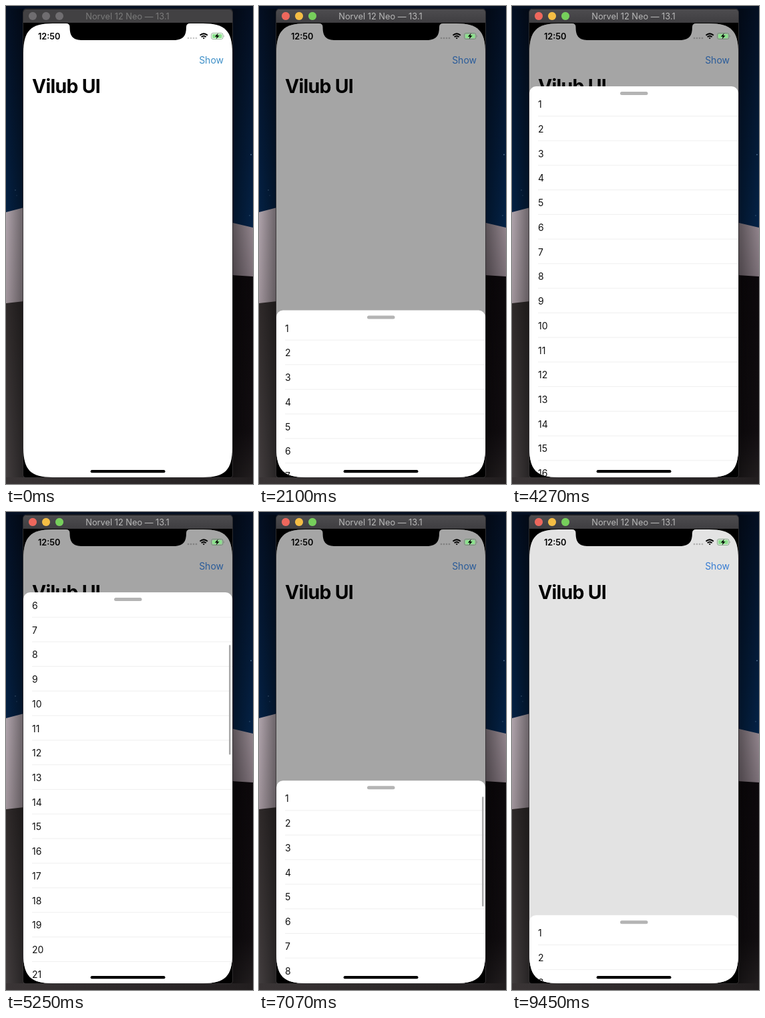
An HTML page for the animation above (9520 ms loop, 370 by 714 pixels).

```html
<!DOCTYPE html>
<html lang="en">
<head>
<meta charset="utf-8">
<title>Bottom sheet</title>
<style>
  html, body { margin: 0; width: 100%; height: 100%; overflow: hidden; background: #050f20; }
  svg { display: block; width: 370px; height: 714px; font-family: Inter, Roboto, sans-serif; }
</style>
</head>
<body>
<svg viewBox="0 0 370 714" xmlns="http://www.w3.org/2000/svg">
  <defs>
    <linearGradient id="sky" x2="0" y2="1"><stop stop-color="#040f22"/><stop offset="1" stop-color="#042348"/></linearGradient>
    <linearGradient id="duneL" x2="0" y2="1"><stop stop-color="#b0a4ac"/><stop offset="1" stop-color="#a0949b"/></linearGradient>
    <linearGradient id="duneR" x2="0" y2="1"><stop stop-color="#93868e"/><stop offset="1" stop-color="#7c7078"/></linearGradient>
    <linearGradient id="darkL" x2="0" y2="1"><stop stop-color="#2f2a2a"/><stop offset="1" stop-color="#433e3f"/></linearGradient>
    <linearGradient id="darkR" x2="0" y2="1"><stop stop-color="#0c080b"/><stop offset=".75" stop-color="#110d10"/><stop offset="1" stop-color="#242021"/></linearGradient>
    <linearGradient id="floor"><stop stop-color="#3a3536"/><stop offset="1" stop-color="#221e1f"/></linearGradient>
    <linearGradient id="shadeL"><stop stop-opacity="0"/><stop offset="1" stop-opacity=".4"/></linearGradient>
    <linearGradient id="shadeR"><stop stop-opacity=".4"/><stop offset="1" stop-opacity="0"/></linearGradient>
    <linearGradient id="bar" x2="0" y2="1"><stop stop-color="#4d4c4f"/><stop offset="1" stop-color="#3f3e41"/></linearGradient>
    <clipPath id="screen">
      <path d="M26 70C26 37 37 26 70 26H295C328 26 339 37 339 70V660C339 693 328 704 295 704H70C37 704 26 693 26 660Z"/>
    </clipPath>
    <clipPath id="list"><rect x="26" y="8" width="314" height="700"/></clipPath>
  </defs>

  <rect width="370" height="340" fill="url(#sky)"/>
  <g fill="#4a6a8c">
    <circle cx="14" cy="275" r=".8"/><circle cx="16" cy="283" r=".6"/>
    <circle cx="367" cy="222" r="1"/><circle cx="365" cy="313" r=".7"/>
  </g>
  <path d="M0 308L27 301V446H0Z" fill="url(#duneL)"/>
  <path d="M338 323.500L370 331V406H338Z" fill="url(#duneR)"/>
  <path d="M0 444L27 441V714H0Z" fill="url(#darkL)"/>
  <path d="M338 402L370 404V714H338Z" fill="url(#darkR)"/>
  <rect y="704" width="370" height="10" fill="url(#floor)"/>
  <rect y="4" width="26" height="700" fill="url(#shadeL)"/>
  <rect x="339" y="4" width="31" height="700" fill="url(#shadeR)"/>

  <path d="M25.500 10q0-6 6-6H334q5.500 0 5.500 6V700q0 4.500-4.500 4.500H30q-4.500 0-4.500-4.500Z" fill="#000" stroke="#4a4748" stroke-width=".6"/>
  <path d="M26 25V10q0-5 5-5H334q5 0 5 5V25Z" fill="#424143"/>
  <path id="barOn" d="M26 25V10q0-5 5-5H334q5 0 5 5V25Z" fill="url(#bar)"/>
  <g fill="#6f6d70"><circle cx="40" cy="15" r="6"/><circle cx="60" cy="15" r="6"/><circle cx="80" cy="15" r="6"/></g>
  <g id="lights">
    <circle cx="40" cy="15" r="6" fill="#ee675c"/><circle cx="60" cy="15" r="6" fill="#f4bd44"/><circle cx="80" cy="15" r="6" fill="#76cf5b"/>
  </g>
  <text id="device" x="182" y="20" font-size="12.8" text-anchor="middle">Norvel 12 Neo — 13.1</text>

  <g clip-path="url(#screen)">
    <rect x="26" y="26" width="314" height="679" fill="#fff"/>
    <text id="show" x="326" y="86" font-size="14" text-anchor="end">Show</text>
    <text x="39" y="129.700" font-size="28.400" font-weight="700" letter-spacing="-.7">Vilub UI</text>
    <rect id="dim" x="26" y="26" width="314" height="679"/>
    <text x="48" y="49.600" font-size="12.700" font-weight="600">12:50</text>
    <g fill="#000" fill-opacity=".22">
      <circle cx="273" cy="48" r="1.300"/><circle cx="277" cy="48" r="1.300"/><circle cx="281" cy="48" r="1.300"/><circle cx="285" cy="48" r="1.300"/>
    </g>
    <g fill="none" stroke="#000" stroke-width="2">
      <path d="M290.500 43.700q5.700-4.600 11.400 0M292.700 46.200q3.500-2.800 7 0"/>
      <path d="M294.600 47.500q1.600-1.200 3.200 0l-1.600 2Z" fill="#000" stroke="none"/>
    </g>
    <rect x="307.500" y="40.500" width="17.500" height="9" rx="2.500" fill="none" stroke="#5a8f5c" stroke-opacity=".65"/>
    <rect x="309" y="42" width="14.500" height="6" rx="1.200" fill="#8ce28d"/>
    <path d="M326.200 43.500q1.200 1.500 0 3Z" fill="#666"/>
    <path d="M317.800 40.500L312.800 45.700H315.800L314.700 49.500L319.600 44.300H316.600Z" fill="#000"/>

    <g id="sheet">
      <rect x="26" width="313" height="800" rx="10" fill="#fff"/>
      <g clip-path="url(#list)"><g id="rows"></g></g>
      <rect x="162" y="8" width="41.500" height="5" rx="2.500" fill="#b4b4b4"/>
      <rect id="thumb" x="334" width="2.500" height="164" rx="1.250" fill="#aaa"/>
    </g>
    <rect x="126.600" y="693.100" width="111.900" height="4.200" rx="2.100" fill="#000"/>
  </g>
  <path d="M90 25v1q5.500 0 5.500 5.500C95.500 46 101 51 115 51H250.500C264.500 51 270 46 270 31.500Q270 26 275.500 26v-1Z"/>
</svg>
<script>
  const LOOP = 9520, STEP = 70;
  const FLOOR = 704, MID = 454.6, FULL = 120;
  const ROW = 36.74, COUNT = 50;
  const $ = id => document.getElementById(id);
  const set = (id, name, value) => $(id).setAttribute(name, value);

  // Eased progress between two times, 0 before and 1 after
  const ease = (t, from, to) => {
    const u = Math.min(1, Math.max(0, (t - from) / (to - from)));
    return u * u * (3 - 2 * u);
  };

  let rows = '';
  for (let i = 0; i < COUNT; i++) {
    const y = 8 + i * ROW;
    rows += `<text x="39" y="${y + 24.1}" font-size="14" fill="#111">${i + 1}</text>` +
      `<path d="M39 ${y + ROW - .3}H340" stroke="#ebebeb" stroke-width=".8"/>`;
  }
  $('rows').innerHTML = rows;

  function draw(t) {
    const active = ease(t, 0, 280);
    set('barOn', 'opacity', active);
    set('lights', 'opacity', active);
    const grey = Math.round(122 + 62 * active);
    set('device', 'fill', `rgb(${grey},${grey},${grey})`);

    const shown = ease(t, 1050, 1470);
    const top = FLOOR + (MID - FLOOR) * shown
      + (FULL - MID) * (ease(t, 2300, 3396) - ease(t, 6700, 7195))
      + 165.2 * ease(t, 7680, 9900);
    const scroll = 330 * (ease(t, 4830, 5590) - ease(t, 5900, 6600));
    set('sheet', 'transform', `translate(0 ${top.toFixed(2)})`);
    set('sheet', 'visibility', shown ? 'visible' : 'hidden');
    set('rows', 'transform', `translate(0 ${(-scroll).toFixed(2)})`);

    // While closing, the shade follows the height of the sheet
    const closing = t > 7680;
    set('dim', 'opacity', closing ? (FLOOR - top) * .00106 : .353 * shown);
    set('show', 'fill', shown ? '#3f8cec' : '#3f90c8');

    set('thumb', 'y', 24 + scroll * .285);
    set('thumb', 'opacity', ease(t, 4800, 4950) - ease(t, 7800, 8150));
  }

  const start = performance.now();
  function tick() {
    const t = (performance.now() - start) % LOOP;
    draw(Math.floor(t / STEP) * STEP);
    requestAnimationFrame(tick);
  }
  tick();
</script>
</body>
</html>
```
